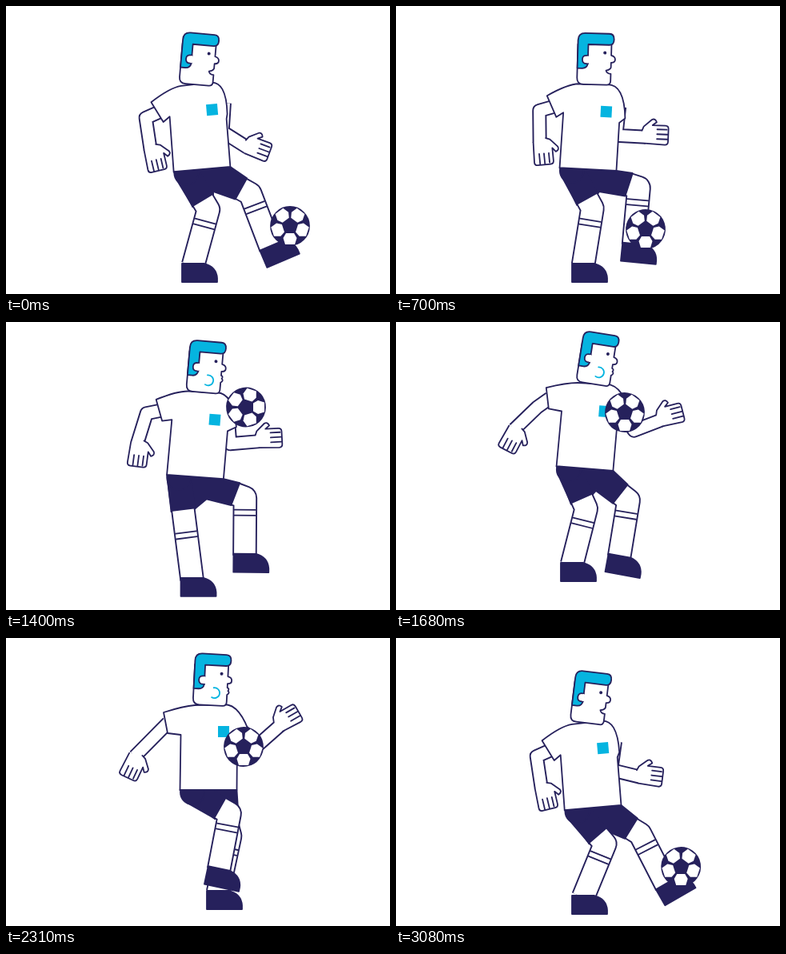
An HTML page for the animation above (3.15 s loop, 480x360 px).

```html
<!DOCTYPE html>
<html lang="en">
<head>
<meta charset="utf-8">
<title>Keepie-uppie</title>
<style>
html, body { margin: 0; width: 100%; height: 100%; overflow: hidden; background: #fff; }
svg { display: block; width: 100vw; height: 100vh; }
</style>
</head>
<body>
<svg id="stage" viewBox="0 0 480 360" fill="#fff" stroke="#26215c" stroke-width="1.8" stroke-linejoin="round" stroke-linecap="round"></svg>
<script>
const LOOP = 3150, STEP = 70, GRAVITY = 0.00125;
const NAVY = '#26215c', CYAN = '#05b4e0';
const THIGH = 53.5, SHIN = 72;

const mix = (a, b, u) => a + (b - a) * u;
const smooth = (t, from, to) => {
  const u = Math.min(1, Math.max(0, (t - from) / (to - from)));
  return u * u * (3 - 2 * u);
};

// Looping monotone cubic through a few keys [time, ...values].
function curve(...keys) {
  const n = keys.length;
  const at = k => keys[(k + n) % n][0] + LOOP * Math.floor(k / n);
  return t => {
    let k = n - 1;
    while (keys[k][0] > t) k--;
    const span = at(k + 1) - at(k), u = (t - at(k)) / span;
    return keys[0].slice(1).map((_, c) => {
      const value = j => keys[(j + n) % n][c + 1];
      const rate = j => (value(j + 1) - value(j)) / (at(j + 1) - at(j));
      const slope = j => {
        const a = rate(j - 1), b = rate(j);
        return a * b <= 0 ? 0 : 2 * a * b / (a + b);
      };
      return mix(value(k), value(k + 1), u * u * (3 - 2 * u))
        + span * u * (1 - u) * (slope(k) * (1 - u) - slope(k + 1) * u);
    });
  };
}

// The pose: pelvis and feet on the stage, the reaching hand relative to the torso.
const pelvisX = curve([0, 245], [700, 240], [1680, 236], [2310, 253], [2660, 255]);
const pelvisY = curve([0, 204], [350, 198], [700, 204], [1120, 204], [1680, 183], [1960, 201],
  [2310, 190], [2660, 208], [2870, 213], [3080, 212]);
const lean = curve([0, -5], [700, 3], [1680, 4.5], [2310, 0], [3080, -5]);
const nod = curve([0, 5], [1120, 1], [1680, 9], [2310, 3], [2660, 11], [3080, 7]);
const reach = curve([0, 59, -22], [700, 70, -44], [1120, 63, -37], [1680, 91, -68],
  [2310, 90, -81], [2660, 86, -43], [3080, 62, -33]);
const nearFoot = curve([0, 234, 324], [1330, 234, 324], [1680, 220, 303], [1960, 236, 320],
  [2310, 266, 290], [2660, 234, 324]);
const farFoot = curve([0, 331, 302], [700, 297, 299], [1120, 312, 291], [1680, 279, 294],
  [1960, 270, 324], [2310, 265, 318], [2660, 345, 300], [3080, 338, 309]);
const spread = t => smooth(t, 1120, 1720) - smooth(t, 2310, 2800);

// Ball contacts; gravity shapes each flight, the last stretch is cushioned by the foot.
const contacts = [
  { t: 0, x: 355, y: 275, spin: 0 }, { t: 700, x: 312, y: 279, spin: 72 },
  { t: 1120, x: 314, y: 198, spin: 108 }, { t: 1680, x: 286, y: 113, spin: 144 },
  { t: 2310, x: 297, y: 136, spin: 216 }, { t: 2660, x: 347, y: 224, spin: 216 },
  { t: 2800, x: 361, y: 284, spin: 216, pull: -0.75 }, { t: LOOP, x: 355, y: 275, spin: 216 }
];

const add = (p, x, y) => [p[0] + x, p[1] + y];
const turn = ([x, y], deg) => {
  const a = deg * Math.PI / 180, c = Math.cos(a), s = Math.sin(a);
  return [x * c - y * s, x * s + y * c];
};
// Rotation that makes a downward shape point from a to b.
const tilt = (a, b) => Math.atan2(a[0] - b[0], b[1] - a[1]) * 180 / Math.PI;

// Middle joint of a two-bone limb; side picks the way it bends.
function joint(a, b, upper, lower, side) {
  const dx = b[0] - a[0], dy = b[1] - a[1], dist = Math.hypot(dx, dy);
  const cos = (upper * upper + dist * dist - lower * lower) / (2 * upper * dist);
  const bend = side * Math.acos(Math.min(1, cos));
  const angle = Math.atan2(dy, dx) + bend;
  return add(a, upper * Math.cos(angle), upper * Math.sin(angle));
}

const place = ([x, y], angle, body) => `<g transform="translate(${x} ${y}) rotate(${angle})">${body}</g>`;
const path = (d, extra = '') => `<path d="${d}" ${extra}/>`;
const line = points => 'M' + points.join('L');
const bar = (points, width, color) =>
  path(line(points), `fill="none" stroke-linecap="butt" stroke="${color}" stroke-width="${width}"`);
const limb = (points, width) => bar(points, width, NAVY) + bar(points, width - 3.8, '#fff');

const HAND = path('M-8-1L-9 24Q-9 28-5 28H11Q15 28 15 24V8L19 13Q24 11 22 7L13-3L8-5')
  + path('M-2 14V27M4 14V27M10 14V26');
const SHOE = path('M-14-2H14Q29 2 30 16V21H-14Z', `fill="${NAVY}"`);
const SOCK = path('M-13 15H13M-13 22H13');

function arm(shoulder, wrist, upper, lower, rest) {
  const elbow = joint(shoulder, wrist, upper, lower, 1);
  return limb([shoulder, elbow, wrist], 18)
    + place(wrist, mix(rest, tilt(elbow, wrist), 0.7), HAND);
}

// A leg with the hem of its shorts just above the knee.
function makeLeg(hip, ankle) {
  const knee = joint(hip, ankle, THIGH, SHIN, -1);
  const dx = (knee[0] - hip[0]) / THIGH, dy = (knee[1] - hip[1]) / THIGH;
  const hem = add(knee, -13 * dx, -13 * dy);
  return {
    hip, knee, ankle, hem,
    low: add(hem, -15 * dy, 15 * dx),
    high: add(hem, 15 * dy, -15 * dx)
  };
}

function drawLeg({ hem, knee, ankle }, grounded) {
  const shin = tilt(knee, ankle);
  return limb([hem, knee, ankle], 30.5) + place(knee, shin, SOCK)
    + place(ankle, shin * 1.1 * (1 - grounded), SHOE);
}

function shorts(near, far, left, right) {
  const crotch = add(left, (right[0] - left[0]) / 2 + 14, (right[1] - left[1]) / 2 + 28);
  const fill = `fill="${NAVY}"`;
  return path(line([left, near.low, near.high, crotch, far.low, far.high, right]) + 'Z', fill)
    + path(line([near.hip, near.low, near.high]) + 'Z', fill)
    + bar([near.hip, near.hem], 31, NAVY)
    + `<circle cx="${near.hip[0]}" cy="${near.hip[1]}" r="15" ${fill}/>`;
}

// Torso space: origin at the middle of the shirt hem.
function shirt(top, cuff, reachX) {
  const sleeve = [38 + (reachX - 60) / 2, -66];
  return path(`M-17-106Q-31-105 ${top}L${cuff}L-34.5-69L-35.5 0H35.5L36-60L${sleeve}Q40-108 19-107Z`)
    + `<rect x="12" y="-80" width="14" height="14" fill="${CYAN}" stroke="none"/>`;
}

function head(angle, puffed) {
  const mouth = puffed ? 'V-23q3 1 1 4q3 2-1 5' : 'V-22q-1 3-6 4q1 4 6 4';
  return place([1.5, -106], angle,
    path(`M-14-56H21V-37q5 1 5 5q0 4-5 4${mouth}V-5Q21 0 16 0H-13Q-21 0-21-8V-50Z`)
    + path('M-21-20V-55Q-21-64-12-64H18Q24-64 24-57Q24-50 18-50H-8V-26Q-9-20-15-20Z', `fill="${CYAN}"`)
    + path('M-8-36q-7-1-7 5q0 6 7 5')
    + path('M-8-34V-28', 'stroke="#fff" stroke-width="3"')
    + `<circle cx="13" cy="-40" r="2" fill="${NAVY}" stroke="none"/>`
    + (puffed ? path('M4-22a6.5 6.5 0 1 1-2 12', `fill="none" stroke="${CYAN}"`) : ''));
}

function ball(t) {
  const next = contacts.findIndex(c => c.t > t);
  const a = contacts[next - 1], b = contacts[next];
  const span = b.t - a.t, u = (t - a.t) / span;
  const arc = GRAVITY / 2 * span * span * u * (1 - u) * (a.pull ?? 1);
  let patches = '';
  for (let k = 0; k < 5; k++)
    patches += path('M-5 9H5L8.5 15L6 23H-6L-8.5 15Z', `stroke="none" transform="rotate(${72 * k})"`);
  return place([mix(a.x, b.x, u), mix(a.y, b.y, u) - arc], mix(a.spin, b.spin, u),
    `<circle r="24" fill="${NAVY}"/>` + patches);
}

function render(t) {
  const pelvis = [...pelvisX(t), ...pelvisY(t)];
  const [slant] = lean(t), [tip] = nod(t), wrist = reach(t), open = spread(t);
  const onStage = p => add(pelvis, ...turn(p, slant));
  const inTorso = body => place(pelvis, slant, body);

  const ankle = nearFoot(t);
  const near = makeLeg(onStage([-20, 3]), ankle);
  const far = makeLeg(onStage([13, 6]), farFoot(t));
  const nearFlat = smooth(ankle[1], 290, 303);
  const farFlat = smooth(far.ankle[1], 311, 318);

  const top = [-56, -89 - 8 * open], cuff = add(top, 13 - 8 * open, 26);
  const shoulder = [(top[0] + cuff[0]) / 2 + 3, (top[1] + cuff[1]) / 2];
  const backWrist = [-62 - 30 * open, -30 - 12 * open];

  stage.innerHTML = inTorso(arm([35, -80], wrist, 36, 37, -93).replace(/^/, ''))
    + drawLeg(far, farFlat)
    + shorts(near, far, onStage([-35.5, 0]), onStage([35.5, 0]))
    + drawLeg(near, nearFlat)
    + inTorso(arm(shoulder, backWrist, 19, 40, -20)
      + shirt(top, cuff, wrist[0])
      + head(tip - slant, t >= 1400 && t < 2870))
    + ball(t);
}

const stage = document.getElementById('stage');
const start = performance.now();
let shown = -1;
function tick(now) {
  const t = Math.floor(Math.max(0, now - start) % LOOP / STEP) * STEP;
  if (t !== shown) render(shown = t);
  requestAnimationFrame(tick);
}
tick(start);
</script>
</body>
</html>
```
